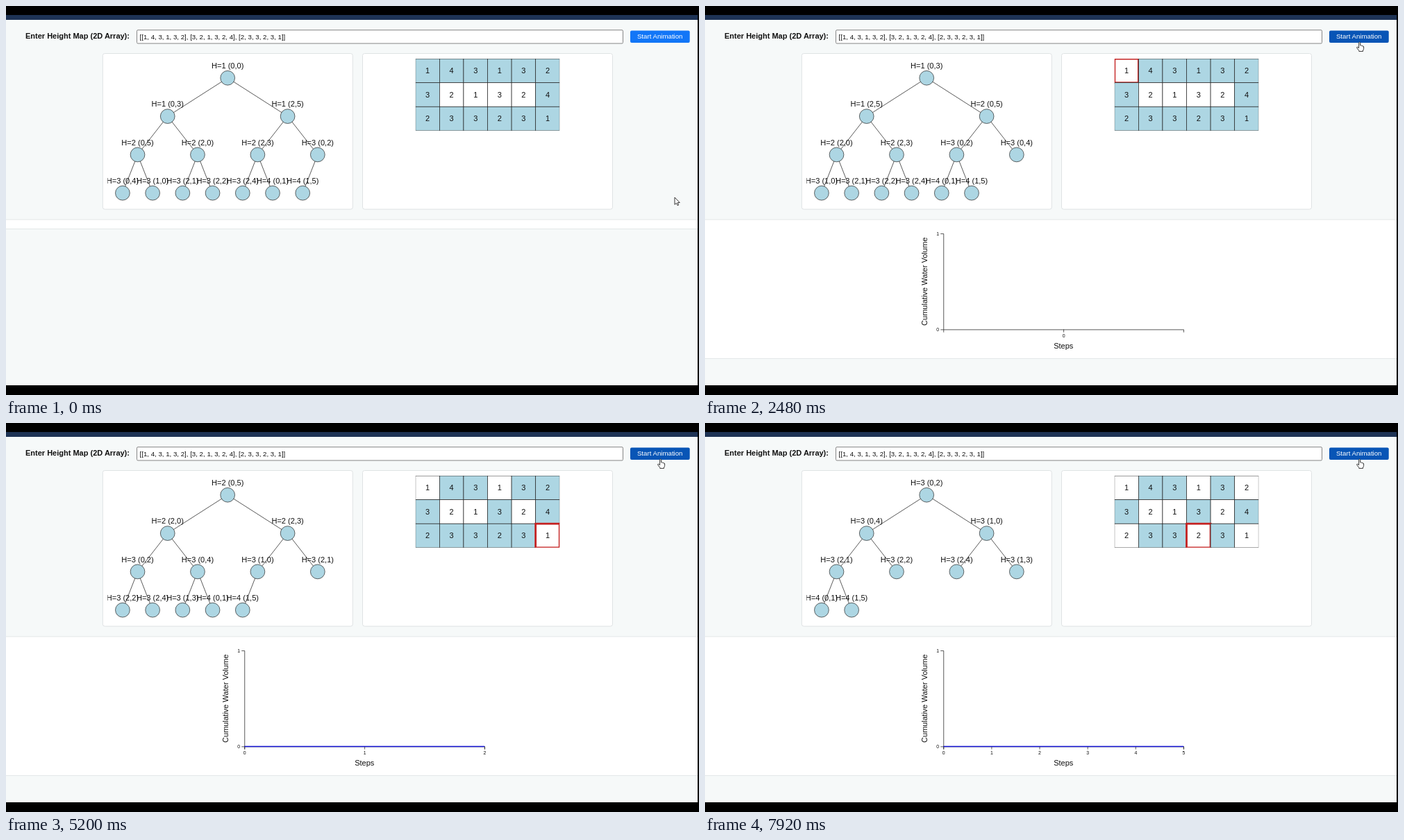
Recreate the animation shown at these times as an HTML page. Size 998 px wide and 561 px high, loop 8000 ms.

```html
<!DOCTYPE html>
<html lang="en">
<head>
<meta charset="utf-8">
<title>Trapped water on a height map</title>
<style>
  html, body { margin: 0; width: 100%; height: 100%; overflow: hidden; background: #000; }
  svg { display: block; }
  text { font-family: "Liberation Sans", Arial, sans-serif; font-size: 16px; fill: #111; }
  .mid { text-anchor: middle; }
  .small { font-size: 14px; }
  .tick { font-size: 10px; }
  .panel { fill: #fff; stroke: #dfe3e4; }
  .edge, .axis { stroke: #111; fill: none; }
  .node { fill: #add6e3; stroke: #222; }
  .cell { fill: #fff; stroke: #222; }
  .queued { fill: #add6e3; }
  .popped { stroke: #c42222; stroke-width: 4; }
  .pushed { stroke: #e6e526; stroke-width: 4; }
  .band { fill: #fff; }
  .rule { fill: #e3e7e8; }
  .cursor { fill: #fff; stroke: #222; stroke-width: .9; stroke-linejoin: round; }
</style>
</head>
<body>
<svg width="998" height="561" viewBox="0 0 998 561">
  <defs>
    <clipPath id="treeClip"><rect width="500" height="300"/></clipPath>
    <clipPath id="gridClip"><rect width="300" height="150"/></clipPath>
  </defs>
  <rect width="998" height="561"/>
  <rect y="13" width="996" height="7" fill="#1e3355"/>
  <rect y="20" width="996" height="527" fill="#f6f9f9"/>

  <text x="28" y="47.3" style="font-size:11px;font-weight:bold">Enter Height Map (2D Array):</text>
  <rect x="188.5" y="34.7" width="700" height="19.3" rx="1.5" fill="#fff" stroke="#858585"/>
  <g transform="translate(192.6 47.6) scale(.6915)"><text id="entry" class="small"></text></g>
  <rect id="button" x="899" y="35.5" width="85.7" height="17.6" rx="2"/>
  <g transform="translate(941.7 47.4) scale(.6915)"><text class="small mid" style="fill:#fff">Start Animation</text></g>

  <rect class="panel" x="139.3" y="68.5" width="360" height="224.6" rx="3"/>
  <rect class="panel" x="513.5" y="68.5" width="360" height="224.6" rx="3"/>
  <g transform="translate(146.3 76.1) scale(.6915)"><g id="tree" clip-path="url(#treeClip)"></g></g>
  <g transform="translate(589.8 76.1) scale(.6915)"><g id="grid" clip-path="url(#gridClip)"></g></g>

  <rect id="band" class="band" y="308" width="996"/>
  <rect class="rule" y="307.5" width="996" height="1"/>
  <rect id="bandEnd" class="rule" width="996" height="1"/>
  <g id="chart" transform="translate(343.4 328.2) scale(.6915)">
    <path class="axis" d="M-6 .5H.5V200.5H-6"/>
    <text class="tick" text-anchor="end" x="-9" y="3.7">1</text>
    <text class="tick" text-anchor="end" x="-9" y="203.7">0</text>
    <path class="axis" d="M.5 206V200.5H500.5V206"/>
    <g id="ticks"></g>
    <path id="line" fill="none" stroke="#1515d6" stroke-width="2.2"/>
    <text class="mid" x="250" y="240.5">Steps</text>
    <text class="mid" transform="translate(-34.5 100) rotate(-90)">Cumulative Water Volume</text>
  </g>

  <g id="cursor" class="cursor">
    <path id="arrow" d="M0 0V10.4L2.5 8.2L4.1 11.7L5.7 11L4.2 7.6H7.3Z"/>
    <path id="hand" d="M-1 1Q0 -.6 1 1V5Q2.2 4.3 2.7 5.5Q4 4.9 4.4 6.1Q5.9 5.8 6 7.2V9.6Q6 11.2 4.9 12.2V13.6H-.8V12.5L-3.9 8.6Q-4.3 7.4 -2.8 7.4L-1 8.9Z"/>
  </g>
</svg>
<script>
const LOOP = 8000, FIRST = 2230, STEP = 1000, FADE = 500;
const HOVER = 870, HOVER_FADE = 200;
const map = [[1, 4, 3, 1, 3, 2], [3, 2, 1, 3, 2, 4], [2, 3, 3, 2, 3, 1]];
const el = id => document.getElementById(id);
const clamp = v => Math.max(0, Math.min(1, v));
const mix = (a, b, k) => a + (b - a) * k;
const cubic = k => k < .5 ? 4 * k ** 3 : 1 - 4 * (1 - k) ** 3;

el("entry").textContent = "[" + map.map(row => "[" + row.join(", ") + "]").join(", ") + "]";

// Flood from the border inwards, lowest wall first
function simulate(count) {
  const seen = new Set(), key = (r, c) => r + "," + c;
  let heap = [];
  const push = (r, c, h) => { seen.add(key(r, c)); heap.push({ h, id: key(r, c), r, c }); };
  map.forEach((row, r) => row.forEach((h, c) => {
    if (r % 2 === 0 || c % 5 === 0) push(r, c, h);
  }));
  heap.sort((a, b) => a.h - b.h);
  const states = [{ heap: [...heap], pushed: [] }];
  for (let i = 0; i < count; i++) {
    const { h, r, c, id } = heap.shift(), pushed = [];
    for (const [dr, dc] of [[0, 1], [0, -1], [1, 0], [-1, 0]]) {
      const y = r + dr, x = c + dc;
      if (map[y]?.[x] === undefined || seen.has(key(y, x))) continue;
      push(y, x, Math.max(h, map[y][x]));
      pushed.push(key(y, x));
    }
    heap.sort((a, b) => a.h - b.h);
    states.push({ heap: [...heap], popped: id, pushed });
  }
  return states;
}

function place(i) {
  const level = Math.floor(Math.log2(i + 1)), width = 2 ** level;
  return { x: 500 * (i + 1 - width + .5) / width, y: 40 + 80 * level };
}

function treeMarkup(heap) {
  let edges = "", nodes = "";
  heap.forEach((item, i) => {
    const { x, y } = place(i);
    if (i) {
      const up = place((i - 1) >> 1);
      edges += `<path class="edge" d="M${up.x} ${up.y}L${x} ${y}"/>`;
    }
    nodes += `<circle class="node" cx="${x}" cy="${y}" r="15"/>` +
      `<text class="mid" x="${x}" y="${y - 20}">H=${item.h} (${item.id})</text>`;
  });
  return edges + nodes;
}

function gridMarkup({ heap, popped, pushed }) {
  const queued = new Set(heap.map(item => item.id));
  return map.map((row, r) => row.map((h, c) => {
    const id = r + "," + c;
    const cls = "cell" + (queued.has(id) ? " queued" : "") +
      (id === popped ? " popped" : "") + (pushed.includes(id) ? " pushed" : "");
    return `<rect class="${cls}" x="${c * 50}" y="${r * 50}" width="50" height="50"/>` +
      `<text class="mid" x="${c * 50 + 25}" y="${r * 50 + 30.5}">${h}</text>`;
  }).join("")).join("");
}

function tickMarkup(last) {
  let out = "";
  for (let i = 0; i <= last; i++) {
    const x = (last ? 500 * i / last : 250) + .5;
    out += `<path class="axis" d="M${x} 200V206"/><text class="tick mid" x="${x}" y="216">${i}</text>`;
  }
  return out;
}

const states = simulate(6);
let shown = -1;

function show(n) {
  if (n === shown) return;
  shown = n;
  el("tree").innerHTML = treeMarkup(states[n].heap);
  el("grid").innerHTML = gridMarkup(states[n]);
  el("chart").style.display = n ? "" : "none";
  el("ticks").innerHTML = n ? tickMarkup(n - 1) : "";
  el("band").setAttribute("height", n ? 200.5 : 13.5);
  el("bandEnd").setAttribute("y", n ? 508 : 321);
}

// Pointer stops: time, x, y
const path = [[0, 963, 276], [240, 962, 273], [720, 953, 216], [800, 948, 140], [880, 943.3, 56], [1000, 942.6, 51.8]];

function pointer(t) {
  const i = path.findIndex(p => p[0] > t);
  if (i < 0) return path[path.length - 1].slice(1);
  const a = path[i - 1], b = path[i], k = (t - a[0]) / (b[0] - a[0]);
  return [mix(a[1], b[1], k), mix(a[2], b[2], k)];
}

function draw(now) {
  const t = now % LOOP;
  const n = t < FIRST ? 0 : Math.min(6, 1 + Math.floor((t - FIRST) / STEP));
  show(n);

  // The lone middle point stretches out to the left end on the second step
  const grow = cubic(clamp((t - FIRST - STEP) / FADE));
  el("line").setAttribute("d", n > 1 ? `M${mix(250, 0, grow)} 200H500` : "");

  const k = clamp((t - HOVER) / HOVER_FADE);
  const rgb = [[18, 118, 247], [8, 85, 182]];
  el("button").setAttribute("fill", `rgb(${rgb[0].map((v, i) => Math.round(mix(v, rgb[1][i], k)))})`);

  const [x, y] = pointer(t);
  el("cursor").setAttribute("transform", `translate(${x} ${y})`);
  el("arrow").style.display = t < HOVER ? "" : "none";
  el("hand").style.display = t < HOVER ? "none" : "";
}

const start = performance.now();
function frame() {
  draw(performance.now() - start);
  requestAnimationFrame(frame);
}
frame();
</script>
</body>
</html>
```
